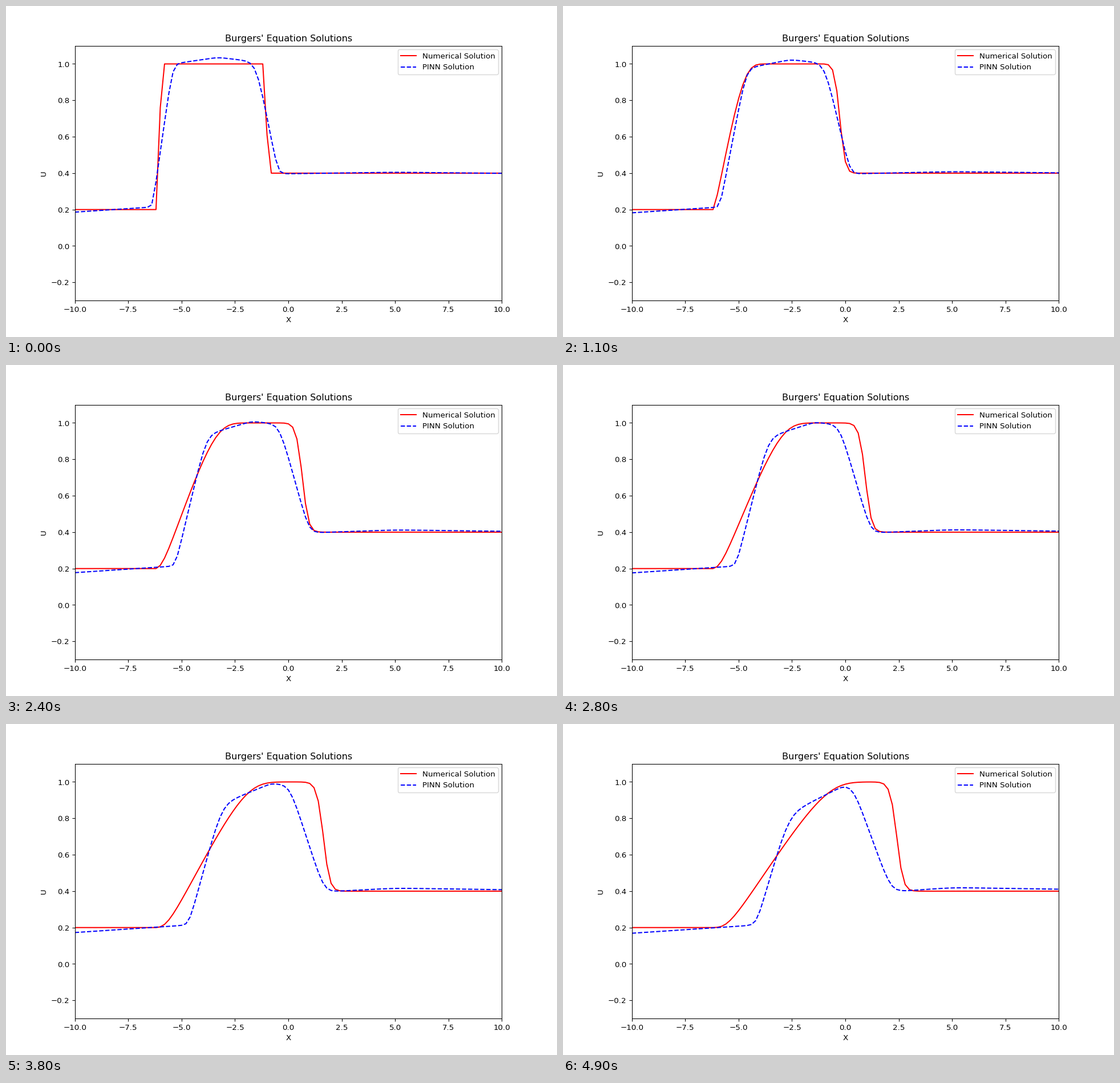
A matplotlib script that plays this animation: 966 by 580 pixels, repeating every 5 s.

```python
import matplotlib.pyplot as plt
import numpy as np
from matplotlib.animation import FuncAnimation

FRAMES, INTERVAL = 50, 100
DT = 0.1
x = np.linspace(-10, 10, 101)
DX = x[1] - x[0]


def solve_burgers():
    """Conservative upwind scheme, one row per frame."""
    u = np.where(x < -6.1, 0.2, np.where(x < -1.1, 1.0, 0.4))
    rows = []
    for _ in range(FRAMES):
        flux = u**2 / 2
        u = u.copy()
        u[1:] -= DT / DX * np.diff(flux)
        rows.append(u)
    return rows


def network_curve(t):
    """Straight pieces between drifting corners, each corner softened."""
    corners = [  # x, u, softness
        (-10, 0.186 - 0.0035 * t, 0),
        (-6.37 + 0.447 * t, 0.214, 0.04 + 0.013 * t),                   # foot
        (-5.41 + 0.745 * t - 0.037 * t**2,
         1.0 - 0.018 * t - 0.0035 * t**2, 0.085 + 0.03 * t),            # left shoulder
        (-3.3 + 0.66 * t, 1.036 - 0.0115 * t, 0.1),                     # peak
        (-1.505 + 0.5135 * t - 0.0273 * t**2, 1.012 - 0.0075 * t, 0.15),  # right shoulder
        (-0.48 + 0.677 * t - 0.0286 * t**2, 0.396, 0.08 + 0.018 * t),   # bottom
        (5, 0.405 + 0.003 * t, 0.3),                                    # low bump
        (10, 0.399 + 0.0024 * t, 0),
    ]
    cx, cu, soft = np.array(corners).T
    slopes = np.diff(cu) / np.diff(cx)
    u = cu[0] + slopes[0] * (x - cx[0])
    for bend, pos, w in zip(np.diff(slopes), cx[1:-1], soft[1:-1]):
        u += bend * w * np.logaddexp(0, (x - pos) / w)
    return u


numerical = solve_burgers()

fig, ax = plt.subplots(figsize=(10.00005, 6.0042), dpi=96.6)
red_line, = ax.plot(x, numerical[0], "r-", label="Numerical Solution")
blue_line, = ax.plot(x, network_curve(0.0), "b--", label="PINN Solution")
ax.set(xlim=(-10, 10), ylim=(-0.3, 1.1), xlabel="X", ylabel="U",
       title="Burgers' Equation Solutions")
ax.legend(loc="upper right")


def update(frame):
    red_line.set_ydata(numerical[frame])
    blue_line.set_ydata(network_curve(frame * DT))
    return red_line, blue_line


anim = FuncAnimation(fig, update, frames=FRAMES, interval=INTERVAL,
                     repeat=True, repeat_delay=0)
plt.show()
```
